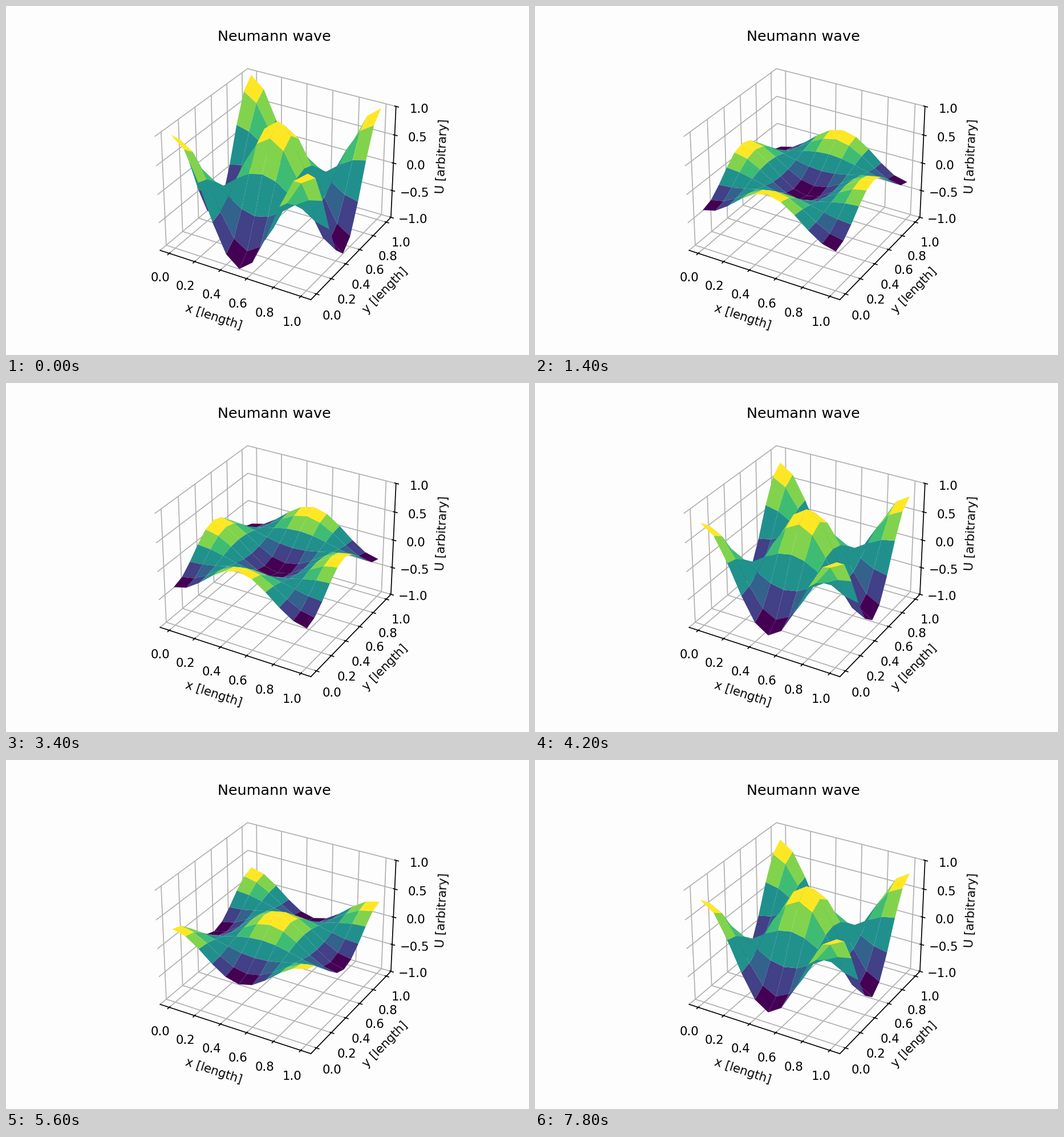
A matplotlib script for the animation above (8 s loop, 917 px wide and 611 px high).

```python
import matplotlib.pyplot as plt
import numpy as np
from matplotlib.animation import FuncAnimation

WIDTH, HEIGHT, DPI = 917, 611, 152.8
FRAMES, PERIOD = 40, 10
PAPER = "#fdfdfd"

x, y = np.meshgrid(np.linspace(0, 1, 11), np.linspace(0, 1, 11))
mode = np.cos(2 * np.pi * x) * np.cos(2 * np.pi * y)

fig = plt.figure(figsize=(WIDTH / DPI, HEIGHT / DPI), dpi=DPI, facecolor=PAPER)
ax = fig.add_subplot(projection="3d", facecolor=PAPER)
ax.set_title("Neumann wave")
ax.set_xlabel("x [length]")
ax.set_ylabel("y [length]")
ax.set_zlabel("U [arbitrary]")
for axis in (ax.xaxis, ax.yaxis, ax.zaxis):
    axis.set_pane_color(PAPER)

# 5 % data margin plus the 1/48 view margin
pad = 0.05 + 1.1 / 48
surface = None


def draw(frame):
    """Standing wave: a fixed spatial mode scaled by a cosine in time."""
    global surface
    if surface is not None:
        surface.remove()
    u = mode * np.cos(2 * np.pi * frame / PERIOD)
    surface = ax.plot_surface(x, y, u, cmap="viridis")
    ax.set(xlim=(-pad, 1 + pad), ylim=(-pad, 1 + pad), zlim=(-1, 1))
    return (surface,)


anim = FuncAnimation(fig, draw, frames=FRAMES, interval=200,
                     repeat=True, repeat_delay=0, blit=False)
plt.show()
```
